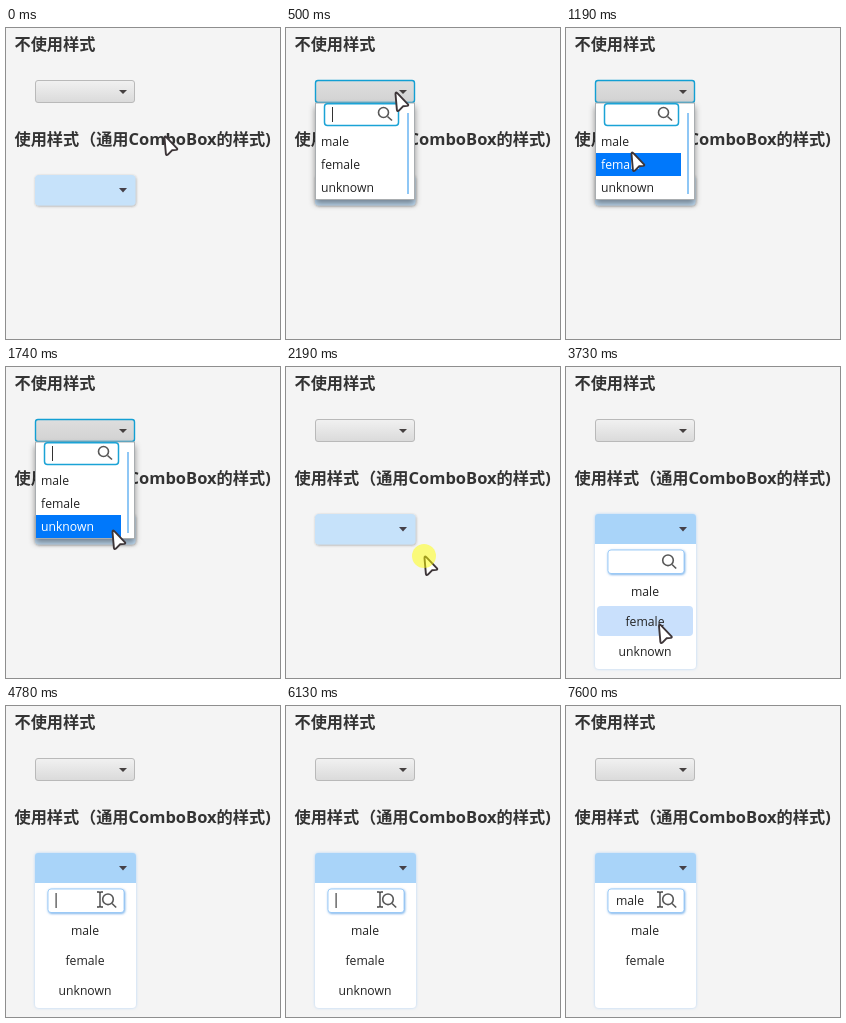
Recreate the animation shown at these times as an HTML page. Size 274 by 311 pixels, loop 8000 ms.

```html
<!DOCTYPE html>
<html lang="zh-CN">
<head>
<meta charset="utf-8">
<title>Combo box styles</title>
<style>
  html, body { margin: 0; width: 100%; height: 100%; overflow: hidden; background: #f4f4f4; }
  svg { display: block; width: 100%; height: 100%; }
  text { font-family: 'Open Sans', 'Noto Sans CJK SC', 'Noto Sans CJK', sans-serif; font-size: 12.2px; fill: #222; }
  .title { font-size: 16.2px; font-weight: 700; fill: #333; }
  .latin { font-size: 16.5px; }
  .mid { text-anchor: middle; }
  .icon { fill: none; stroke: #575757; stroke-width: 1.6; }
</style>
</head>
<body>
<svg viewBox="0 0 274 311">
  <defs>
    <linearGradient id="grey" x2="0" y2="1">
      <stop offset="0" stop-color="#f1f1f1"/><stop offset="1" stop-color="#dadada"/>
    </linearGradient>
    <linearGradient id="light" x2="0" y2="1">
      <stop offset="0" stop-color="#f9f9f9"/><stop offset="1" stop-color="#e4e4e4"/>
    </linearGradient>
    <linearGradient id="pressed" x2="0" y2="1">
      <stop offset="0" stop-color="#dedede"/><stop offset="1" stop-color="#d2d2d2"/>
    </linearGradient>
    <filter id="drop" x="-20%" y="-20%" width="140%" height="140%">
      <feDropShadow dx="0" dy="4" stdDeviation="3" flood-color="#000" flood-opacity=".42"/>
    </filter>
    <filter id="soft" x="-20%" y="-30%" width="140%" height="160%">
      <feDropShadow dx=".5" dy=".8" stdDeviation="1.2" flood-color="#333" flood-opacity=".4"/>
    </filter>
    <filter id="glow" x="-20%" y="-20%" width="140%" height="140%">
      <feDropShadow dx="0" dy="0" stdDeviation="1.4" flood-color="#8fc3f7" flood-opacity=".65"/>
    </filter>
    <filter id="field" x="-20%" y="-40%" width="140%" height="180%">
      <feDropShadow dx=".6" dy=".8" stdDeviation="1.2" flood-color="#3d8fe0" flood-opacity=".8"/>
    </filter>
  </defs>

  <rect width="274" height="311" fill="#f4f4f4"/>
  <text class="title" x="8.5" y="22">不使用样式</text>
  <text class="title" x="8.5" y="117">使用样式<tspan dx=".7">（</tspan>通用<tspan class="latin">ComboBox</tspan>的样式)</text>

  <rect id="plain" x="29.5" y="52.5" width="99" height="22" rx="2.5"/>
  <path d="M113 62h8l-4 4z" fill="#454040"/>

  <rect id="styled" x="29" y="147" width="100.5" height="30.5" rx="4" fill="#c6e2fa" filter="url(#soft)"/>

  <g id="popA">
    <rect x="29.5" y="75" width="99" height="96.5" fill="#fff" stroke="#a9adb0" filter="url(#drop)"/>
    <rect x="38.5" y="75.8" width="74" height="21.7" rx="3" fill="#fff" stroke="#1ba3d6" stroke-width="1.5"/>
    <path class="icon" d="M101.5 88.5l4.5 4"/><circle class="icon" cx="97.5" cy="84.5" r="5"/>
    <rect x="121" y="85" width="2" height="81" fill="#8fc7f5"/>
    <rect id="hotA" x="30" width="85" height="23" fill="#0078fb"/>
    <g id="rowsA"></g>
    <rect id="caretA" x="46" y="79" width="1" height="15" fill="#333"/>
  </g>

  <g id="popB">
    <rect x="29" y="147" width="101" height="155" rx="4" fill="#fff" filter="url(#glow)"/>
    <path d="M29 177V150q0-3 3-3h95q3 0 3 3v27z" fill="#a9d4f9"/>
    <rect x="42" y="183" width="76" height="23.5" rx="3" fill="#fff" stroke="#8ec4f6" stroke-width=".8" filter="url(#field)"/>
    <path class="icon" d="M106 197.5l4.2 4"/><circle class="icon" cx="102" cy="193.3" r="5.3"/>
    <rect id="hotB" x="31" width="96" height="30" rx="4" fill="#c9e0fc"/>
    <g id="rowsB"></g>
    <text id="typed" x="50" y="199">male</text>
    <rect id="caretB" y="187" width="1.2" height="15" fill="#444"/>
  </g>
  <path id="arrowB" d="M113 160h8l-4 4.5z" fill="#454048"/>

  <path id="arrow" d="M1.5 3Q1.5 .6 3.3 2.2L14 13.4Q14.9 14.7 13.2 14.9L9 15.3L4.9 19.6Q3.2 21 2.9 18.8Z" fill="#fff" stroke="#3d3538" stroke-width="1.9" stroke-linejoin="round"/>
  <path id="beam" d="M-3-7.5h2q1 0 1 1q0-1 1-1h2M0-6.5v13M-3 7.5h2q1 0 1-1q0 1 1 1h2" fill="none" stroke="#444" stroke-width="1.4"/>
  <circle id="press" r="12" fill="#ff0" fill-opacity=".5"/>
</svg>
<script>
const LOOP = 8000;
const names = ['male', 'female', 'unknown'];
const el = {};
document.querySelectorAll('svg [id]').forEach(e => el[e.id] = e);
const show = (e, on) => e.setAttribute('display', on ? 'inline' : 'none');
const set = (e, k, v) => e.setAttribute(k, v);
const within = (t, a, b) => t >= a && t < b;

function addRows(group, x, y, step, cls) {
  return names.map((name, i) => {
    const e = document.createElementNS('http://www.w3.org/2000/svg', 'text');
    set(e, 'x', x);
    set(e, 'y', y + i * step);
    set(e, 'class', cls);
    e.textContent = name;
    group.append(e);
    return e;
  });
}
const rowsA = addRows(el.rowsA, 35, 118, 23, '');
const rowsB = addRows(el.rowsB, 79, 229, 30, 'mid');

// Pointer moves in discrete steps along a polyline.
const track = [[0, 157, 107]];
function move(start, end, steps, ...pts) {
  const path = [track[track.length - 1].slice(1), ...pts];
  for (let i = 0; i < steps; i++) {
    const p = (i + 1) / steps * (path.length - 1);
    const k = Math.min(Math.floor(p), path.length - 2);
    const [a, b] = [path[k], path[k + 1]];
    const time = steps > 1 ? start + (end - start) * i / (steps - 1) : start;
    track.push([time, a[0] + (b[0] - a[0]) * (p - k), a[1] + (b[1] - a[1]) * (p - k)]);
  }
}
move(50, 200, 4, [108, 63]);
move(860, 1190, 8, [86, 98], [64, 123]);
move(1240, 1240, 1, [62, 147]);
move(1490, 1980, 10, [105, 162], [137, 188]);
move(2280, 2490, 4, [119, 163]);
move(2940, 3130, 5, [99, 217]);
move(3240, 3580, 8, [94, 246], [89, 272]);
move(3730, 4030, 6, [94, 240], [95, 215], [92, 197]);
move(4280, 4380, 3, [94, 193.5]);

const blinkA = [450, 950, 1490, 1980];
const blinkB = [2780, 3280, 3780, 4280, 4780, 5240, 5330, 6080, 6130, 6990, 7240, 7600];
const lit = (toggles, t) => toggles.filter(x => x <= t).length % 2 === 1;

function hover(hot, top, step, on, x, y, left, right) {
  const i = Math.floor((y - top) / step);
  const hit = on && x > left && x < right && i >= 0 && i < names.length;
  show(hot, hit);
  if (hit) set(hot, 'y', top + i * step);
  return hit ? i : -1;
}

function draw(t) {
  const [, x, y] = track.filter(k => k[0] <= t + 0.01).pop();
  const openA = within(t, 450, 2190), openB = t >= 2780;
  const typed = t >= 6490;

  const overA = x > 29 && x < 129 && y > 52 && y < 75;
  set(el.plain, 'fill', `url(#${openA ? 'pressed' : overA ? 'light' : 'grey'})`);
  set(el.plain, 'stroke', openA ? '#129fd3' : '#b9b9b9');
  set(el.plain, 'stroke-width', openA ? 1.4 : 1);

  show(el.popA, openA);
  show(el.popB, openB);
  show(el.styled, !openB);
  show(el.arrowB, !openA);
  const hotA = hover(el.hotA, 102, 23, openA, x, y + 3, 30, 115);
  rowsA.forEach((e, i) => e.style.fill = i === hotA ? '#fff' : '');
  hover(el.hotB, 209, 30, openB, x, y, 31, 127);
  show(rowsB[2], t < 7150);

  show(el.typed, typed);
  set(el.caretB, 'x', typed ? 77.5 : 49.5);
  show(el.caretA, lit(blinkA, t));
  show(el.caretB, lit(blinkB, t));

  const inText = openA && x > 38 && x < 113 && y > 75 && y < 98
    || openB && x > 42 && x < 118 && y > 183 && y < 207;
  show(el.arrow, !inText);
  show(el.beam, inText);
  set(inText ? el.beam : el.arrow, 'transform', `translate(${x} ${y})`);

  show(el.press, within(t, 400, 500) || within(t, 2190, 2280) || within(t, 2690, 2940));
  set(el.press, 'cx', x + 1);
  set(el.press, 'cy', y + 1);
}

const begin = performance.now();
function frame() {
  draw((performance.now() - begin) % LOOP);
  requestAnimationFrame(frame);
}
draw(0);
requestAnimationFrame(frame);
</script>
</body>
</html>
```
